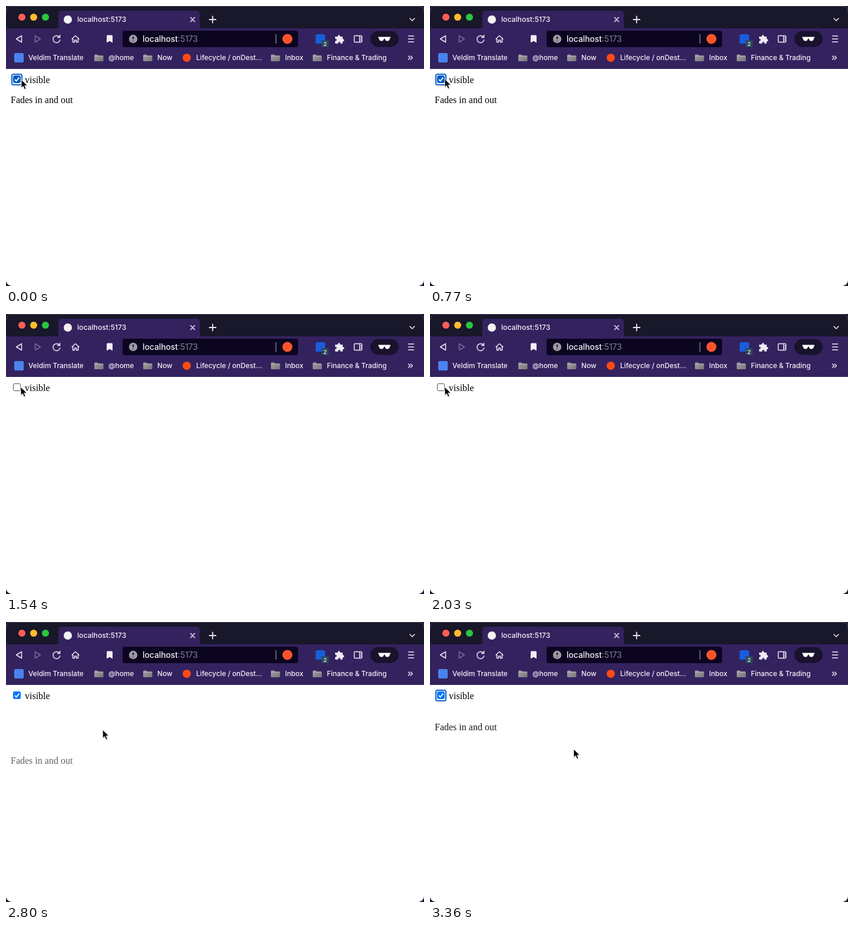
Recreate the animation shown at these times as an HTML page. Size 710 px wide and 476 px high, loop 3430 ms.

```html
<!DOCTYPE html>
<html lang="en">
<head>
<meta charset="utf-8">
<title>Fade and fly transition</title>
<style>
  html, body { margin: 0; width: 100%; height: 100%; overflow: hidden; background: #1b1930; }
  svg { display: block; width: 710px; height: 476px; }
  .ui { font-family: Inter, Roboto, sans-serif; font-weight: 500; fill: #f3f1f8; }
  .page { font: 16px "Liberation Serif", "Times New Roman", serif; }
  .line { fill: none; stroke: #eceaf3; stroke-width: 1.5; stroke-linecap: round; stroke-linejoin: round; }
</style>
</head>
<body>
<svg viewBox="0 0 710 476" xmlns="http://www.w3.org/2000/svg">
  <defs>
    <clipPath id="window"><rect width="710" height="476" rx="10"/></clipPath>
    <linearGradient id="folderFill" x2="1" y2="1">
      <stop stop-color="#a3a1a5"/><stop offset="1" stop-color="#77757a"/>
    </linearGradient>
    <g id="folder">
      <path d="M0 2q0-1.5 1.5-1.5h4l1.5 1.5h7q1.5 0 1.5 1.5v7q0 1.5-1.5 1.5h-12.500q-1.500 0-1.500-1.500z" fill="url(#folderFill)"/>
      <path d="M.5 3.500h14.500" stroke="#bab8bd" stroke-width=".7"/>
    </g>
  </defs>

  <g clip-path="url(#window)">
    <rect width="710" height="476" fill="#fff"/>
    <rect width="710" height="38" fill="#19172a"/>
    <rect y="38" width="710" height="69" fill="#34225f"/>
    <path d="M0 .5h710" stroke="#454354"/>
    <path d="M89 38V14q0-6 6-6h228q6 0 6 6v24z" fill="#34225f"/>

    <!-- tab strip -->
    <circle cx="27" cy="19" r="6" fill="#ff5f57"/>
    <circle cx="47" cy="19" r="6" fill="#febc2e"/>
    <circle cx="67" cy="19" r="6" fill="#28c840"/>
    <circle cx="105" cy="23" r="7" fill="#f1f0f3"/>
    <text class="ui" x="121" y="27" font-size="12.2">localhost:5173</text>
    <g class="line">
      <path d="M313.500 19.500l7 7m0-7l-7 7"/>
      <path d="M351 17.500v11m-5.500-5.500h11" stroke-width="1.8"/>
      <path d="M686 21l4 4 4-4"/>
    </g>

    <!-- toolbar -->
    <g class="line">
      <path d="M17.500 56l9-5.500v11z"/>
      <path d="M58.500 56l-9-5.500v11z" stroke="#77699b"/>
      <path d="M90.500 52.500a6 6 0 1 0 1.300 5.200M91.500 49.500v4h-4"/>
      <path d="M112 56l6-5.500 6 5.500M113.500 55v6.500h3V58h3v3.500h3V55"/>
      <rect x="591.500" y="50.500" width="13" height="11" rx="1.500"/>
      <path d="M600.500 51v10m0-7.500h3m-3 2.500h3m-3 2.500h3" stroke-width="1.2"/>
      <path d="M683.500 51h9m-9 5h9m-9 5h9"/>
    </g>
    <path d="M171 51q0-1.500 1.500-1.500h7q1.500 0 1.500 1.500v11.500l-5-3-5 3z" fill="#f3f1f8"/>
    <rect x="198" y="42" width="298" height="28" rx="4" fill="#0b0520"/>
    <circle cx="216" cy="56" r="7.200" fill="#9b99a3"/>
    <path d="M216 52v4.500m0 2.600v1.200" stroke="#0b0520" stroke-width="1.800"/>
    <text class="ui" x="232" y="61" font-size="13.8">localhost<tspan fill="#8b8797" font-weight="400">:5173</tspan></text>
    <path d="M458.500 48v16" stroke="#aaa7b4"/>
    <circle cx="478" cy="56" r="8.500" fill="#fb542b"/>
    <rect x="526" y="48" width="16" height="16" rx="2" fill="#175ddc"/>
    <rect x="536" y="58" width="12" height="12" rx="2" fill="#2c4a5b"/>
    <text class="ui" x="542" y="67.500" font-size="9.500" text-anchor="middle">2</text>
    <path d="M559.500 52h4v-.8a2 2 0 0 1 4 0v.8h3.500q1 0 1 1v3.200h.6a1.900 1.900 0 0 1 0 3.800h-.6v2.700q0 1-1 1h-3v-.8a1.900 1.900 0 0 0-3.800 0v.8h-4.200q-1 0-1-1v-3.200h.8a1.900 1.900 0 0 0 0-3.800h-.8V53q0-1 .5-1z" fill="#eceaf3"/>
    <rect x="619" y="42.500" width="48" height="27" rx="13.500" fill="#18122d"/>
    <path d="M632.500 52.500h20.500v2l-1 .5q-.5 4.500-4.500 4.500-3.300 0-4-4h-1.500q-.7 4-4 4-4 0-4.500-4.500l-1-.5z" fill="#fff"/>

    <!-- bookmarks -->
    <rect x="14" y="80" width="16" height="16" rx="2" fill="#4b83ee"/>
    <use href="#folder" x="150" y="82"/>
    <use href="#folder" x="233" y="82"/>
    <circle cx="307" cy="88" r="7" fill="#ff4a16"/>
    <use href="#folder" x="450" y="82"/>
    <use href="#folder" x="521" y="82"/>
    <g class="ui" font-size="11.800">
      <text x="38" y="92">Veldim Translate</text>
      <text x="174" y="92">@home</text>
      <text x="257" y="92">Now</text>
      <text x="323" y="92">Lifecycle / onDest…</text>
      <text x="474" y="92">Inbox</text>
      <text x="545" y="92">Finance &amp; Trading</text>
    </g>
    <path class="line" d="M683.500 85l3 3-3 3m4-6l3 3-3 3" stroke-width="1.300"/>

    <!-- page -->
    <rect id="ring" x="10" y="116" width="17" height="18" rx="2.500" fill="none" stroke="#0f62cc" stroke-width="2"/>
    <rect id="box" x="12.500" y="118.500" width="12" height="12" rx="2"/>
    <path id="tick" d="M15 125l2.500 2.500 5-6" fill="none" stroke="#fff" stroke-width="1.900"/>
    <text class="page" x="32" y="131">visible</text>
    <text class="page" id="message" x="8" y="165">Fades in and out</text>
    <g id="cursor">
      <path d="M.5 2v14l3.400-3 2.300 5 2.500-1-2.200-5h4.500z" fill="#000" opacity=".18"/>
      <path d="M0 0v14.200l3.200-3 2.400 5.400 2.500-1.100-2.300-5.200h4.500z" fill="#000" stroke="#fff" stroke-width=".9"/>
    </g>
  </g>
</svg>
<script>
  const LOOP = 3430, STEP = 70;
  const HIDE_AT = 1100, FADE = 420;
  const SHOW_AT = 2221, FLY = 2095, FLY_Y = 200;
  const LEAVE_AT = 2480, LEAVE = 540;
  const REFOCUS_AT = 3150;

  const byId = id => document.getElementById(id);
  const [ring, box, tick, message, cursor] =
    ['ring', 'box', 'tick', 'message', 'cursor'].map(byId);
  const set = (el, attrs) => {
    for (const name in attrs) el.setAttribute(name, attrs[name]);
  };
  const progress = (t, start, duration) =>
    Math.min(1, Math.max(0, (t - start) / duration));
  const cubicOut = p => 1 - (1 - p) ** 3;
  const smooth = p => p * p * (3 - 2 * p);

  function cursorAt(t) {
    if (t < 700) return [26, 125];
    if (t < 2300) return [25, 124];
    const p = smooth(progress(t, LEAVE_AT, LEAVE));
    return [24 + 220 * p, 126 + 90 * p];
  }

  function messageAt(t) {
    if (t < SHOW_AT) return { opacity: 1 - progress(t, HIDE_AT, FADE), y: 0 };
    const p = cubicOut(progress(t, SHOW_AT, FLY));
    return { opacity: p, y: FLY_Y * (1 - p) };
  }

  function draw(t) {
    const checked = t < HIDE_AT || t >= SHOW_AT;
    const focused = t < HIDE_AT || t >= REFOCUS_AT;
    const [x, y] = cursorAt(t);
    const hovered = x < 75 && y < 136;
    const blue = hovered ? '#005cc8' : '#0075ff';
    const gray = hovered ? '#4f4f4f' : '#767676';
    const text = messageAt(t);

    set(ring, { opacity: focused ? 1 : 0 });
    set(box, { fill: checked ? blue : '#fff', stroke: checked ? blue : gray });
    set(tick, { opacity: checked ? 1 : 0 });
    set(message, { opacity: text.opacity, transform: `translate(0 ${text.y})` });
    set(cursor, { transform: `translate(${x} ${y})` });
  }

  const start = performance.now();
  function frame() {
    const t = (performance.now() - start) % LOOP;
    draw(Math.floor(t / STEP) * STEP);
    requestAnimationFrame(frame);
  }
  draw(0);
  requestAnimationFrame(frame);
</script>
</body>
</html>
```
